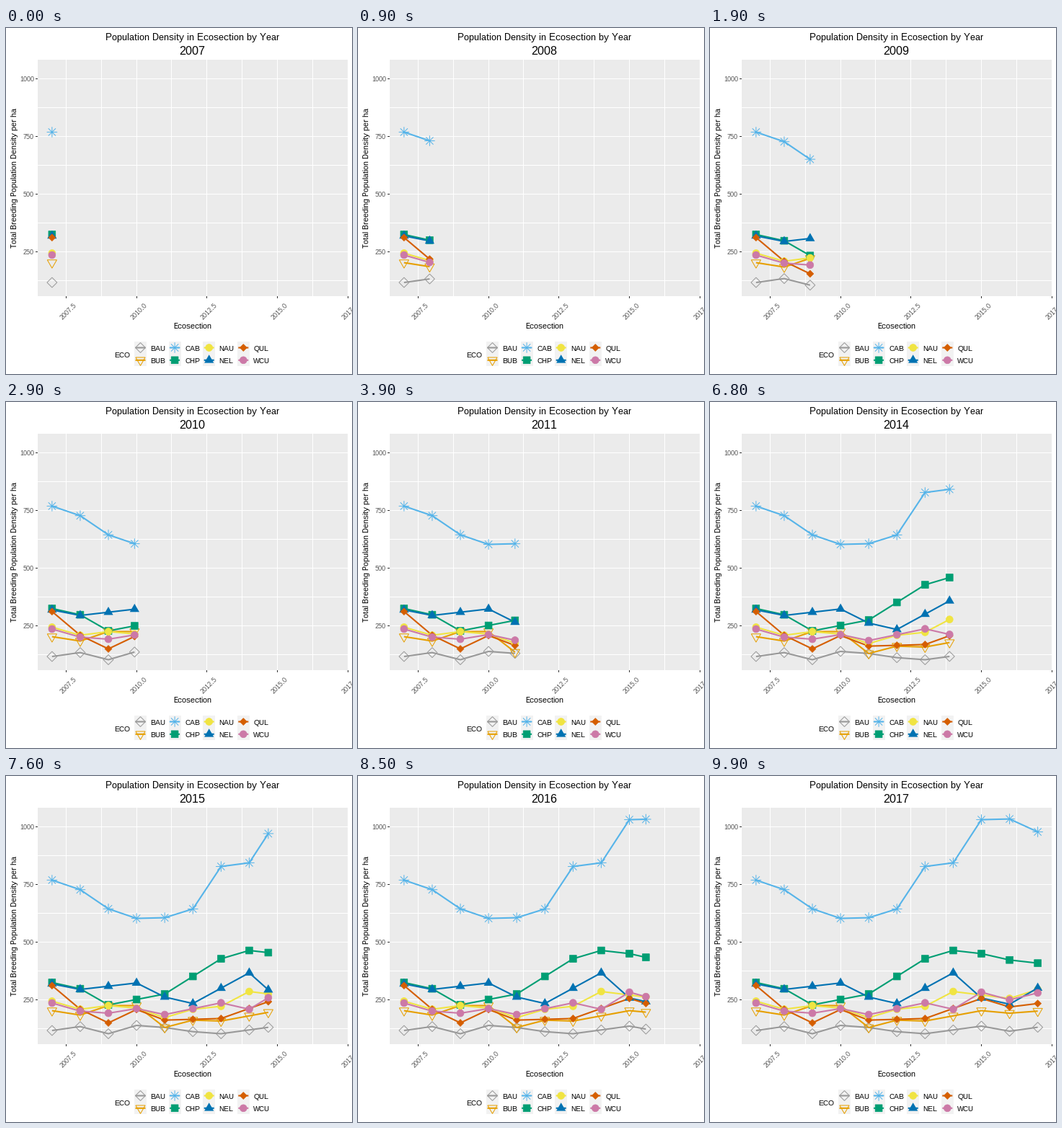
A matplotlib script that plays this animation: 480 px wide and 480 px high, repeating every 10 s.

```python
import numpy as np
import matplotlib.pyplot as plt
from matplotlib.animation import FuncAnimation
from matplotlib.patches import PathPatch, Rectangle
from matplotlib.path import Path

SIZE, FRAMES, INTERVAL = 480, 100, 100
PT = 0.75  # points per pixel at 96 dpi
YEARS = np.arange(2007, 2018)
LEFT, RIGHT, TOP, BOTTOM = 44, 474.5, 44, 372

# Fully hinted glyphs on whole-pixel advances, without kerning
plt.rcParams.update({
    "font.family": "Liberation Sans",
    "text.hinting": "native",
    "text.hinting_factor": 1,
    "text.kerning_factor": 6,
})
fig = plt.figure(figsize=(5, 5), dpi=96, facecolor="white")
ax = fig.add_axes([0, 0, 1, 1])
ax.set(xlim=(0, SIZE), ylim=(SIZE, 0))
ax.axis("off")


def px(year):
    return 63.86 + 39.08 * (year - 2007)


def py(value):
    return 390.5 - 0.32 * value


def text(x, y, s, size, color="black", **kw):
    kw = {"ha": "center", "va": "baseline", **kw}
    return ax.text(x, y, s, fontsize=size * PT, color=color, **kw)


def line(xs, ys, color, width=1.0, z=1):
    return ax.plot(xs, ys, color=color, lw=width * PT, zorder=z, snap=False,
                   solid_capstyle="butt", solid_joinstyle="round")[0]


def box(x, y, w, h, color):
    ax.add_patch(Rectangle((x, y), w, h, fc=color, lw=0, zorder=0))


def ring(n, radius, start=0):
    """Closed regular polygon; angles run clockwise on screen."""
    a = np.radians(start) + 2 * np.pi * np.arange(n + 1) / n
    return Path(radius * np.column_stack([np.cos(a), np.sin(a)]), closed=True)


def star(radius):
    a = np.pi / 4 * np.arange(4)
    tips = radius * np.column_stack([np.cos(a), np.sin(a)])
    return Path(np.stack([tips, -tips], axis=1).reshape(-1, 2),
                [Path.MOVETO, Path.LINETO] * 4)


R = 4.9
D = R * 2 ** 0.5
T = R * 1.555

# shape: outline, filled, edge width
SHAPES = {
    "diamond": (ring(4, D), False, 1),
    "down": (ring(3, T, 90), False, 1),
    "star": (star(D), False, 1),
    "square": (ring(4, D, 45), True, 0.7),
    "dot": (ring(40, R), True, 0.7),
    "up": (ring(3, T, -90), True, 0),
    "rhomb": (ring(4, R), True, 0.7),
}

# Density at each turn, one slot per year; gaps are eased across.
_ = np.nan
SERIES = {
    "BAU": ("#999999", "diamond", [117, 134, 103, 139, _, _, 103, _, 136, 114, 131]),
    "BUB": ("#E69F00", "down", [203, 184, 225, 225, 130, 162, 158, _, 203, 192, 201]),
    "CAB": ("#56B4E9", "star", [769, _, _, 603, 606, 644, 828, 844, 1031, 1034, 978]),
    "CHP": ("#009E73", "square", [325, 298, 228, _, 275, _, 428, 464, _, _, 409]),
    "NAU": ("#F0E442", "dot", [244, 209, 225, 214, 173, 209, 222, 286, _, 256, 295]),
    "NEL": ("#0072B2", "up", [319, 295, _, 323, 262, 234, _, 367, 258, 231, 301]),
    "QUL": ("#D55E00", "rhomb", [312, 209, 150, 208, 162, _, 169, _, 256, 219, 234]),
    "WCU": ("#CC79A7", "dot", [236, 201, 192, 212, 186, _, 237, 209, 283, 250, 280]),
}


def fill_gaps(values):
    values = np.array(values)
    known = np.flatnonzero(~np.isnan(values))
    order = np.arange(len(known))
    t = np.interp(np.arange(len(values)), known, order)
    eased = np.floor(t) + (1 - np.cos(np.pi * (t % 1))) / 2
    return np.interp(eased, order, values[known])


def stamp(shape, xs, ys):
    outline = SHAPES[shape][0]
    return Path.make_compound_path(
        *(Path(outline.vertices + p, outline.codes) for p in zip(xs, ys)))


def markers(shape, color, xs, ys):
    _, filled, edge = SHAPES[shape]
    patch = PathPatch(stamp(shape, xs, ys), ec=color, lw=edge * PT,
                      fc=color if filled else "none", zorder=3, snap=False,
                      capstyle="round", joinstyle="miter")
    return ax.add_patch(patch)


def draw_panel():
    box(LEFT, TOP, RIGHT - LEFT, BOTTOM - TOP, "#EBEBEB")
    for v in range(125, 1001, 125):
        y = py(v)
        line([LEFT, RIGHT], [y, y], "white")
        if v % 250 == 0:
            line([LEFT - 3, LEFT], [y, y], "#333333")
            text(39, y + 3.5, str(v), 9, "#4D4D4D", ha="right")
    for k in range(9):
        year = 2007.5 + 1.25 * k
        x = np.floor(px(year)) + 0.5
        line([x, x], [TOP, BOTTOM], "white")
        if k % 2 == 0:
            line([x, x], [BOTTOM, BOTTOM + 3], "#333333")
            text(x + 3, 393, f"{year:.1f}", 9.4, "#4D4D4D",
                 va="center", rotation=45)
    text(258.5, 17, "Population Density in Ecosection by Year", 13)
    text(258.5, 417, "Ecosection", 11)
    text(15.5, 208.5, "Total Breeding Population Density per ha", 11,
         rotation=90, rotation_mode="anchor")


def draw_legend():
    text(150.5, 457, "ECO", 10, ha="left")
    for i, (name, (color, shape, _)) in enumerate(SERIES.items()):
        x = 186.5 + 47.6 * (i // 2)
        y = 443.5 + 17.3 * (i % 2)
        box(x - 8.6, y - 8.6, 17.2, 17.2, "#F2F2F2")
        line([x - 7, x + 7], [y, y], color, 2.1, z=2)
        markers(shape, color, [x], [y])
        text(x + 14, y + 4, name, 10, ha="left")


draw_panel()
draw_legend()
year_label = text(258.5, 37, "", 16)
trails = [(line([], [], color, 2.1, z=2), markers(shape, color, [0], [0]),
           shape, py(fill_gaps(values)))
          for color, shape, values in SERIES.values()]


def update(i):
    now = 2007 + 10 * i / (FRAMES - 1)
    past = YEARS < now
    xs = px(np.append(YEARS[past], now))
    for trail, dots, shape, heights in trails:
        ys = np.append(heights[past], np.interp(now, YEARS, heights))
        trail.set_data(xs, ys)
        dots.set_path(stamp(shape, xs, ys))
    year_label.set_text(str(round(now)))
    return [year_label]


anim = FuncAnimation(fig, update, frames=FRAMES, interval=INTERVAL,
                     repeat=True, repeat_delay=0, blit=False)
plt.show()
```
